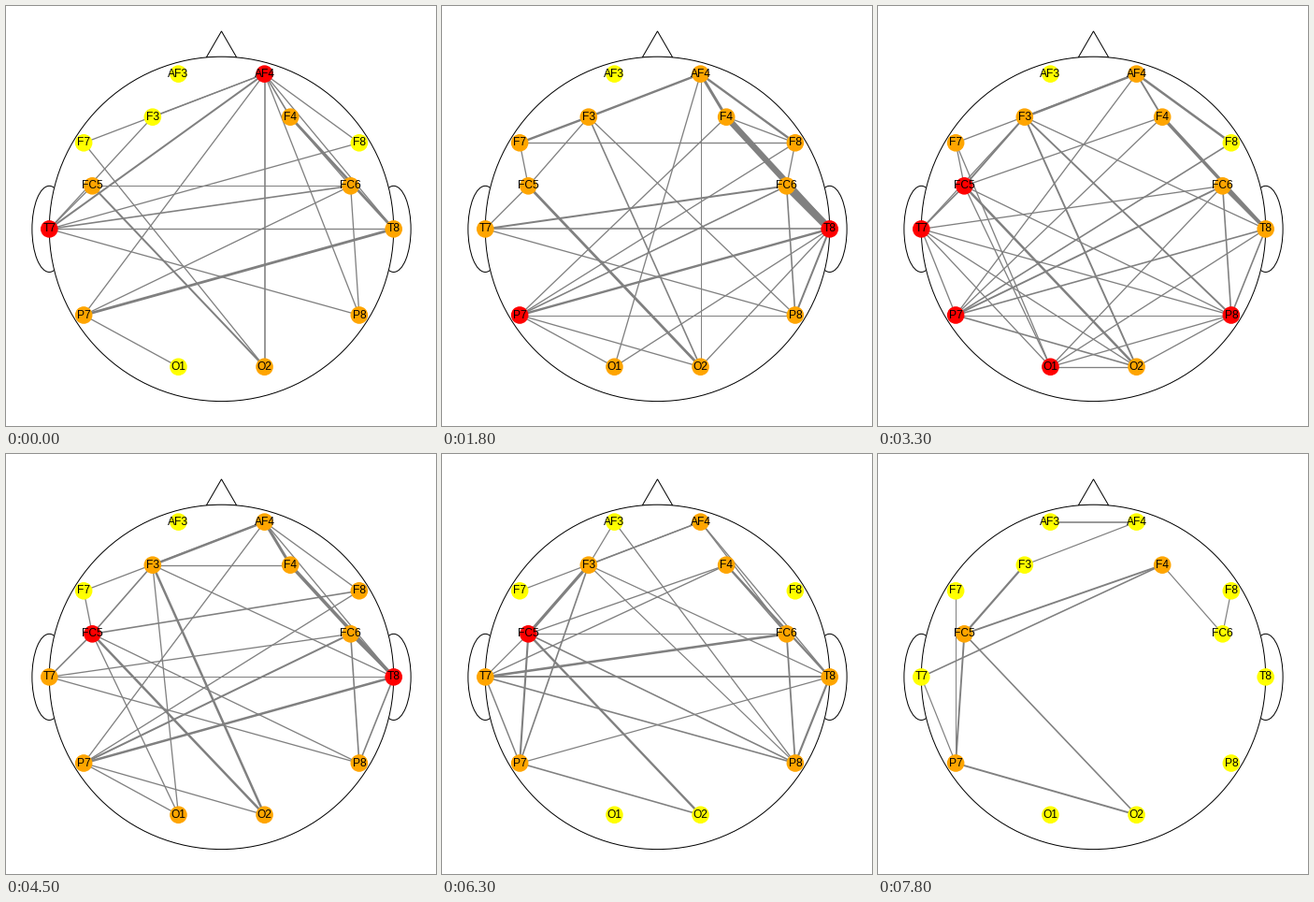
These frames come from a looping animation (460x449 px, 8000 ms). A matplotlib script:

```python
import random
import matplotlib.pyplot as plt
from matplotlib.animation import FuncAnimation
from matplotlib.collections import LineCollection
from matplotlib.patches import Circle, Ellipse, Polygon

W, H, DPI = 460, 449, 64  # a power of two keeps the pixel size exact
CX, CY, R = 230.5, 238.4, 184.2
PX = 72 / DPI
STEP, TICK, LOOP = 300, 100, 8000

# Electrode rows: height, then distance from the midline, in head radii
ROWS = [("AF3", "AF4", 0.9, 0.25), ("F3", "F4", 0.65, 0.4),
        ("F7", "F8", 0.5, 0.8), ("FC5", "FC6", 0.25, 0.75),
        ("T7", "T8", 0, 1), ("P7", "P8", -0.5, 0.8), ("O1", "O2", -0.8, 0.25)]

# Step -> {line width: "hub:neighbour,neighbour ..."}
SCENES = {
    0: {1: "FC5:FC6",
        1.3: "AF4:F7,F3,P7,P8,T8,F8 F3:T7 FC5:T7 T7:F8,T8,P8 F7:O2 "
             "P7:FC6,O1 FC6:P8,F4",
        1.6: "AF4:O2,F4 T7:FC6", 2: "AF4:T7 FC5:O2", 2.8: "F4:T8 P7:T8"},
    6: {1: "AF4:O2 P7:P8",
        1.3: "F7:F8,FC5 F3:FC5,P8 FC5:T7 AF4:O1 F4:F8,P7 F8:FC6,P7 "
             "T7:P8 P7:O1,O2 T8:O1,O2",
        1.6: "T7:T8 P7:FC6 FC6:P8 F3:O2", 2: "T7:FC6 T8:P8",
        2.4: "AF4:F3,F8 F3:F7 P7:T8", 2.8: "FC5:O2", 3: "AF4:F4",
        6.5: "F4:T8", 8: "FC6:T8"},
    11: {1: "P7:P8",
         1.3: "AF4:F7,P7 F3:T8,T7 F7:FC5,O1 FC5:F4,O1,P8 F4:P7 "
              "T7:FC6,P7,O1,O2,P8 O1:FC6,T8,P8,O2 P8:O2",
         1.6: "F8:P7 P7:T8,O2 FC6:P8 T8:P8 FC5:T7", 1.9: "F3:O2,P8,FC5 AF4:F4 P7:FC6",
         2.5: "AF4:F3,F8 FC5:O2", 3.5: "F4:T8 FC6:T8"},
    15: {1: "T7:T8",
         1.3: "AF4:F7,P7,F8,T8 F3:F4,T8,O1 F7:FC5 FC5:O1,P8 T7:FC6,P8 "
              "P7:F8,O1,O2",
         1.6: "F3:FC5 FC5:F8,T7 FC6:P8 T8:P8", 2: "P7:FC6",
         2.5: "AF4:F3 F3:O2 P7:T8 FC5:O2 FC6:T8", 3: "AF4:F4", 3.6: "F4:T8"},
    19: {1.3: "AF3:F3,P8 AF4:F7,FC5,T7,O1,P8,T8,F4 F3:O2,P8 FC5:F8,T7 "
              "T7:P7,P8 P7:O2 F4:FC6",
         1.6: "AF4:F3 FC5:P8", 2: "FC5:P7 F3:P7 P7:T8 FC6:P8",
         2.4: "F3:FC5 P7:FC6 T8:P8", 2.8: "T7:T8 FC5:O2", 3.2: "T7:FC6 F4:T8"},
    23: {1: "FC5:FC6 T7:T8",
         1.3: "AF3:P8 AF4:F3,T8 F3:P7,T8 F4:P8,T8 P7:O1",
         1.6: "AF4:FC6 F4:FC5,FC6 F7:P7 FC5:P8 T7:P7 FC6:P8",
         1.9: "T7:FC6,P8 FC5:O2 T8:P8 P7:O2", 2.2: "AF3:T7 FC5:P7",
         2.5: "F4:T7", 4: "F3:FC5"},
    26: {1: "F7:P7", 1.2: "AF4:F3 F4:FC6 F8:FC6 T7:P7",
         1.6: "AF3:AF4 F4:T7 FC5:O2", 1.9: "F4:FC5 FC5:P7 P7:O2", 2.2: "F3:FC5"},
}


def head_point(x, y):
    return CX + x * R, CY - y * R


def parse(groups):
    edges = {}
    for width, text in groups.items():
        for star in text.split():
            hub, ends = star.split(":")
            for end in ends.split(","):
                edges[tuple(sorted((hub, end)))] = width
    return edges


POS = {}
for left, right, height, offset in ROWS:
    POS[left] = head_point(-offset, height)
    POS[right] = head_point(offset, height)

KEYS = sorted(SCENES)
NETS = {key: parse(groups) for key, groups in SCENES.items()}


def network(step):
    """Edge widths at a step; edges come and go at staggered moments."""
    if step in NETS:
        return NETS[step]
    a = max(k for k in KEYS if k < step)
    b = min(k for k in KEYS if k > step)
    t = (step - a) / (b - a)
    old, new = NETS[a], NETS[b]
    rng = random.Random(a)
    edges = {}
    for edge in sorted(set(old) | set(new)):
        switch = rng.uniform(0.2, 0.8)
        if edge in old and edge in new:
            edges[edge] = old[edge] + (new[edge] - old[edge]) * t
        elif edge in old and t < switch:
            edges[edge] = 1.2 + (old[edge] - 1.2) * (1 - t / switch)
        elif edge in new and t >= switch:
            edges[edge] = 1.2 + (new[edge] - 1.2) * (t - switch) / (1 - switch)
    return edges


def node_color(degree):
    return "red" if degree >= 7 else "orange" if degree >= 3 else "yellow"


fig = plt.figure(figsize=(W / DPI, H / DPI), dpi=DPI, facecolor="white")
ax = fig.add_axes([0, 0, 1, 1])
ax.set_xlim(0, W)
ax.set_ylim(H, 0)
ax.axis("off")

outline = dict(facecolor="white", edgecolor="black", linewidth=PX)
for side in (-1, 1):
    ax.add_patch(Ellipse(head_point(side, 0), 0.2 * R, 0.5 * R, zorder=1, **outline))
ax.add_patch(Polygon([head_point(-0.088, 0.996), head_point(0, 1.148),
                      head_point(0.088, 0.996)], zorder=1, **outline))
ax.add_patch(Circle((CX, CY), R, zorder=2, **outline))

lines = LineCollection([], colors="gray", zorder=3)
ax.add_collection(lines, autolim=False)
nodes = {}
for name, point in POS.items():
    nodes[name] = ax.add_patch(Circle(point, 9.3, linewidth=0, zorder=4))
    ax.text(*point, name, fontsize=12 * PX, family="Liberation Sans",
            ha="center", va="center", zorder=5)


def draw(frame):
    edges = network(frame * TICK // STEP)
    lines.set_segments([[POS[a], POS[b]] for a, b in edges])
    lines.set_linewidths([width * PX for width in edges.values()])
    for name, node in nodes.items():
        node.set_facecolor(node_color(sum(name in edge for edge in edges)))
    return [lines, *nodes.values()]


anim = FuncAnimation(fig, draw, frames=LOOP // TICK, interval=TICK,
                     repeat=True, repeat_delay=0, blit=False)
plt.show()
```
